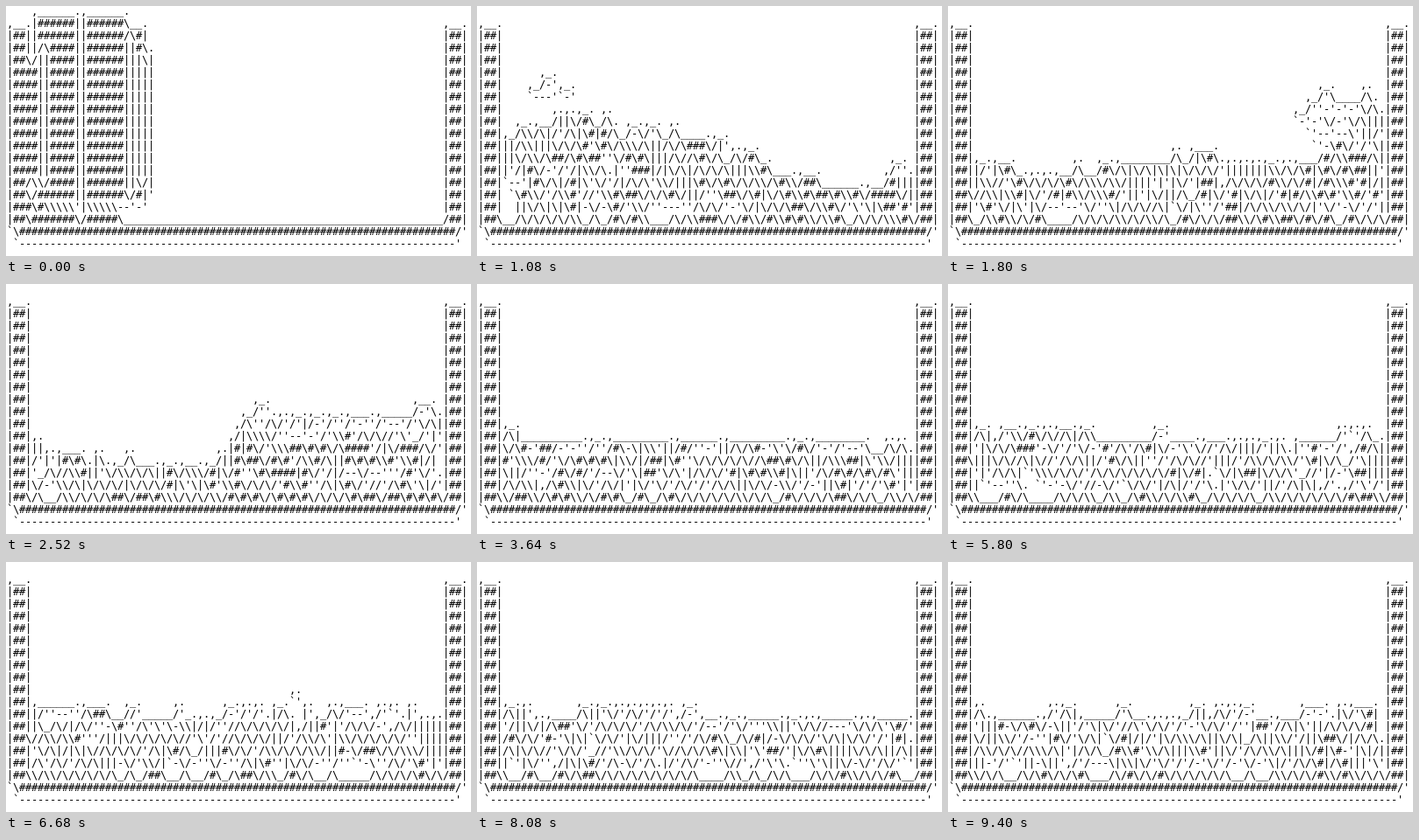
These frames come from a looping animation (530 px wide and 286 px high, 9440 ms). An HTML page:

```html
<!DOCTYPE html>
<html lang="en">
<head>
<meta charset="utf-8">
<title>ASCII fluid</title>
<style>
  html, body { margin: 0; width: 530px; height: 286px; overflow: hidden; background: #fff; }
  pre {
    position: absolute; left: 1px; top: -1px; margin: 0; color: #000;
    font: 12px/14px "DejaVu Sans Mono", monospace;
    letter-spacing: calc(7px - 1ch);
    height: 287px; width: 529px; overflow: hidden;
  }
</style>
</head>
<body>
<pre id="screen"></pre>
<script>
// Particle fluid: a column of water collapses in a tank.
const GRAVITY = 1, PRESSURE = 4, VISCOSITY = 8;
const COLS = 79, ROWS = 23, WARM_UP = 5, STEPS_PER_PICTURE = 2, LOOP = 9440;
const GLYPHS = " '`-.|//,\\|\\_\\/#";

// Bursts of pictures: first time, last time, number of pictures.
const BURSTS = [
  [80, 1000, 17], [1080, 1960, 16], [2040, 2960, 17], [3040, 3920, 16], [4000, 4920, 18],
  [4960, 5840, 16], [5920, 6840, 18], [6880, 7760, 17], [7840, 8720, 18], [8800, 9400, 13],
];
const times = [0];
for (const [first, last, count] of BURSTS)
  for (let i = 0; i < count; i++)
    times.push(Math.floor((first + (last - first) * i / (count - 1)) / 40 + 1e-6) * 40);

const isWall = (row, col) =>
  row === 18 ? col >= 1 && col <= 72 : row === 17 || row >= 1 && (col <= 2 || col >= 71);
const isWater = (row, col) => row >= 1 && row <= 15 && col >= 4 && col <= 20;

const particles = [];
for (let row = 0; row <= 18; row++)
  for (let col = 0; col <= 73; col++) {
    const wall = isWall(row, col);
    if (wall || isWater(row, col))
      for (const half of [0, 1])
        particles.push({ x: col, y: 2 * row + half, vx: 0, vy: 0, wall });
  }
const count = particles.length;
const xs = new Float64Array(count), ys = new Float64Array(count);

function step() {
  particles.forEach((p, i) => { xs[i] = p.x; ys[i] = p.y; });
  particles.forEach((p, i) => {
    p.density = p.wall ? 9 : 0;
    p.near = [];
    const { x, y } = p;
    for (let j = 0; j < count; j++) {
      const dx = x - xs[j], dy = y - ys[j], square = dx * dx + dy * dy;
      if (square >= 4) continue;
      const w = Math.sqrt(square) / 2 - 1;
      p.density += w * w;
      p.near.push({ q: particles[j], dx, dy, w });
    }
  });
  for (const p of particles) {
    p.fx = 0;
    p.fy = GRAVITY;
    for (const { q, dx, dy, w } of p.near) {
      const push = 3 - p.density - q.density;
      p.fx += w * (dx * push * PRESSURE + p.vx * VISCOSITY - q.vx * VISCOSITY) / p.density;
      p.fy += w * (dy * push * PRESSURE + p.vy * VISCOSITY - q.vy * VISCOSITY) / p.density;
    }
  }
  for (const p of particles) {
    if (p.wall) continue;
    p.x += p.vx += p.fx / 10;
    p.y += p.vy += p.fy / 10;
  }
}

// Each particle marks the four corners of its cell; the bits select a glyph.
function render() {
  const cells = new Uint8Array((COLS + 1) * (ROWS + 1));
  for (const p of particles) {
    const col = Math.trunc(p.x), row = Math.trunc(p.y / 2);
    if (col < 0 || col >= COLS || row < 0 || row >= ROWS) continue;
    const at = row * (COLS + 1) + col, below = at + COLS + 1;
    cells[at] |= 8;
    cells[at + 1] |= 4;
    cells[below] |= 2;
    cells[below + 1] = 1;
  }
  return Array.from(cells, (bits, i) => ((i + 1) % (COLS + 1) ? GLYPHS[bits] : "\n")).join("");
}

function advance(steps) {
  while (steps--) step();
}

advance(WARM_UP);
const pictures = times.map(() => {
  const picture = render();
  advance(STEPS_PER_PICTURE);
  return picture;
});

const screenText = document.getElementById("screen");
let shown = -1;
function tick() {
  const time = performance.now() % LOOP;
  let index = times.length - 1;
  while (times[index] > time) index--;
  if (index !== shown) screenText.textContent = pictures[shown = index];
  requestAnimationFrame(tick);
}
tick();
</script>
</body>
</html>
```
